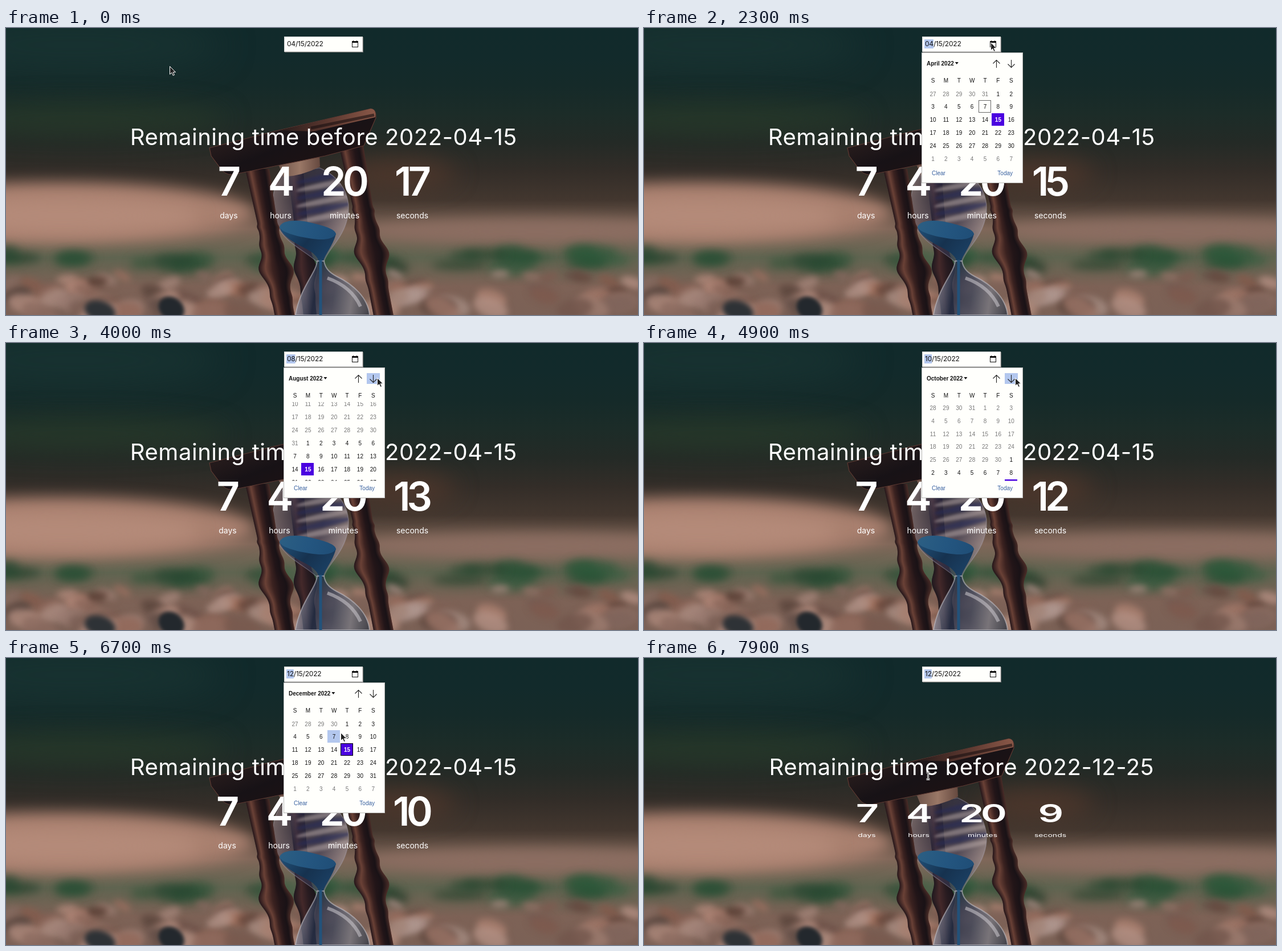
An HTML page with a canvas for the animation above (8 s loop, 1109 by 505 pixels).

```html
<!DOCTYPE html>
<html lang="en">
<head>
<meta charset="utf-8">
<title>Countdown</title>
<style>
html, body { margin: 0; width: 100%; height: 100%; overflow: hidden; background: #10292b; }
canvas { display: block; }
</style>
</head>
<body>
<canvas id="stage" width="1109" height="505"></canvas>
<script>
const W = 1109, H = 505, LOOP = 8000, STEP = 100;
const stage = document.getElementById('stage').getContext('2d');
const UI = '"Liberation Sans", Arial, sans-serif', SANS = 'Inter, sans-serif';

const clamp = v => Math.max(0, Math.min(1, v));
const smooth = v => v * v * (3 - 2 * v);
const bump = (u, at, width) => Math.exp(-(((u - at) / width) ** 2));

// Linear gradient with evenly spaced colours.
function fade(g, x0, y0, x1, y1, colors) {
  const grad = g.createLinearGradient(x0, y0, x1, y1);
  colors.forEach((c, i) => grad.addColorStop(i / (colors.length - 1), c));
  return grad;
}

// ---------- Photo backdrop ----------
function paintBackdrop() {
  const canvas = document.createElement('canvas');
  canvas.width = W;
  canvas.height = H;
  const g = canvas.getContext('2d');
  let seed = 11;
  const rnd = () => (seed = seed * 16807 % 2147483647) / 2147483647;
  const blob = (x, y, rx, ry, color, blur, turn = 0) => {
    g.filter = `blur(${blur}px)`;
    g.fillStyle = color;
    g.beginPath();
    g.ellipse(x, y, rx, ry, turn, 0, 7);
    g.fill();
  };
  const shape = (d, fill, stroke, width = 1) => {
    const path = new Path2D(d);
    if (fill) { g.fillStyle = fill; g.fill(path); }
    if (stroke) { g.strokeStyle = stroke; g.lineWidth = width; g.stroke(path); }
  };

  g.fillStyle = fade(g, 0, 0, 0, H, ['#112a2b', '#122a2b', '#152a29', '#1c2c28', '#242a26',
    '#332d28', '#43372f', '#806759', '#5f6450', '#7d6256', '#7b6156']);
  g.fillRect(0, 0, W, H);
  blob(120, 30, 260, 50, 'rgba(30,58,54,.5)', 30);
  blob(130, 160, 260, 28, 'rgba(44,62,42,.6)', 22);
  blob(90, 325, 345, 54, '#a9806f', 13);
  blob(100, 330, 240, 30, '#b48a79', 14);
  blob(690, 255, 100, 28, 'rgba(92,60,46,.6)', 20);
  blob(930, 358, 300, 22, '#8b6d61', 11);

  // Out-of-focus grass, then pebbles that grow towards the viewer
  for (let i = 0; i < 34; i++)
    blob(rnd() * W, 393 + rnd() * 30, 20 + rnd() * 30, 6 + rnd() * 9, `hsla(140,34%,${16 + rnd() * 13}%,.6)`, 8);
  for (let i = 0; i < 90; i++) {
    const depth = i / 90;
    blob(rnd() * W, 432 + depth * 75, 16 + depth * 20, 7 + depth * 13,
      `hsla(16,${16 + rnd() * 12}%,${27 + rnd() * 36}%,.8)`, 6, rnd() - .5);
  }
  blob(165, 498, 28, 18, '#2e3236', 4, .3);
  blob(290, 494, 24, 20, '#23282d', 3, .6);

  // Turned wooden post: a leaning axis with a radius that depends on the distance to the bulb.
  const post = (x, top, bulbY, lean, size, colors) => {
    for (let y = top; y < H; y++) {
      const u = y - bulbY;
      const r = size * (17.5 + Math.max(0, -u - 80) * .035 + 13 * bump(u, 0, 20)
        + 4 * bump(u, -42, 12) + 2 * bump(u, -75, 5) + 2 * bump(u, 48, 10));
      const cx = x + (y - top) * lean;
      g.fillStyle = fade(g, cx - r, 0, cx + r, 0, colors);
      g.fillRect(cx - r, y, 2 * r, 1.5);
    }
  };
  const wood = ['#25161a', '#6a4136', '#3b2220', '#221518', '#191216', '#4a2c27'];

  g.filter = 'blur(.6px)';
  post(508, 250, 422, .1, .66, ['#1f181e', '#44292a', '#281b20', '#1a151b']);

  // Upper glass with slanting reflections
  const bulb = new Path2D('M485 258C468 275 462 315 475 346C488 377 525 392 545 411H558C565 388 593 370 600 330C606 292 585 261 550 246Z');
  g.fillStyle = fade(g, 468, 290, 602, 320, ['rgba(150,132,136,.6)', 'rgba(54,52,80,.5)', 'rgba(62,62,90,.6)', 'rgba(160,146,150,.65)']);
  g.fill(bulb);
  g.save();
  g.clip(bulb);
  for (let i = 0; i < 6; i++)
    blob(560, 262 + i * 14, 52, 5, i % 2 ? 'rgba(188,172,170,.5)' : 'rgba(40,44,88,.6)', 2, -.2);
  g.restore();
  g.filter = 'blur(.6px)';
  g.strokeStyle = 'rgba(170,165,180,.4)';
  g.lineWidth = 1.5;
  g.stroke(bulb);

  // Sand
  shape('M480 350C483 363 500 375 522 386C540 395 546 402 550 412H556C560 397 573 385 579 362Z',
    fade(g, 490, 350, 560, 410, ['#1f4c73', '#16324f', '#1b4064']));
  shape('M480 350C485 336 516 337 541 344C566 350 579 356 579 363C569 377 539 372 511 366C492 361 482 356 480 350Z',
    fade(g, 480, 340, 580, 370, ['#2c5f83', '#245680', '#1f4d76']));

  // Lower glass
  shape('M546 410C544 432 516 456 508 505H638C635 474 609 451 580 437C565 429 560 421 558 410Z',
    fade(g, 508, 470, 638, 490, ['rgba(150,146,158,.8)', 'rgba(38,48,72,.8)', 'rgba(58,68,90,.75)', 'rgba(120,124,136,.7)', 'rgba(45,52,64,.8)']),
    'rgba(190,188,196,.6)', 2);
  shape('M564 440Q606 455 622 490', null, 'rgba(205,200,206,.55)', 6);
  shape('M552 408V505', null, '#23527a', 5);

  // Collar, front posts and top plate
  shape('M478 240L550 222L551 244Q520 260 487 262Z', fade(g, 480, 0, 551, 0, ['#6f554b', '#9a7867', '#66493f']));
  post(441, 248, 425, .187, 1, wood);
  post(606, 208, 395, .19, 1, wood);
  shape('M357 211L470 182L640 142Q650 143 649 158L628 207L560 225L398 258Q386 259 378 249L360 225Z',
    fade(g, 450, 180, 480, 255, ['#241a1b', '#171216', '#1c1214']), '#5c3932', 1.2);
  shape('M480 180L640 142Q650 143 648 157L540 182Z',
    fade(g, 480, 0, 649, 0, ['#2a1c1b', '#5a372f', '#8a5848']));
  shape('M535 176L646 153', null, 'rgba(24,16,18,.6)', 5);
  return canvas;
}

// ---------- Interface ----------
function text(str, x, y, font, color = '#fff', align = 'left', spacing = 0) {
  stage.font = font;
  stage.fillStyle = color;
  stage.textAlign = align;
  stage.letterSpacing = spacing + 'px';
  stage.fillText(str, align === 'center' ? x + spacing / 2 : x, y);
  return stage.measureText(str).width;
}
function box(x, y, w, h, fill, stroke) {
  if (fill) { stage.fillStyle = fill; stage.fillRect(x, y, w, h); }
  if (stroke) { stage.strokeStyle = stroke; stage.lineWidth = 1; stage.strokeRect(x + .5, y + .5, w - 1, h - 1); }
}
function line(d, color, width = 1) {
  stage.strokeStyle = color;
  stage.lineWidth = width;
  stage.stroke(new Path2D(d));
}

const WHITE = '#fffffc', HOVER = '#b3c7ee', ACCENT = '#4a00e0', LINK = '#365f9f';
const OPEN = 2300, CLOSE = 7800, SETTLED = 6300;
// Presses of the "next month" arrow; the calendar follows the field after a short lag.
const CLICKS = [3280, 3450, 3650, 3850, 4550, 4850, 5350, 6050], LAG = 50, SCROLL = 250;
// Pointer moves: start, duration, end point
const MOVES = [
  [500, 400, 577, 82], [1100, 300, 613, 38], [1800, 200, 608, 25],
  [2600, 300, 651, 61], [6400, 600, 522, 201], [7100, 300, 498, 207]];
const MONTHS = ['April', 'May', 'June', 'July', 'August', 'September', 'October', 'November', 'December'];
const DAY = 864e5, ORIGIN = Date.UTC(2022, 2, 27);
const firstWeek = m => Math.floor((Date.UTC(2022, m + 3, 1) - ORIGIN) / DAY / 7);
const monthAt = t => CLICKS.filter(c => c <= t).length;

function pointerAt(t) {
  let x = 287, y = 67;
  for (const [start, span, toX, toY] of MOVES) {
    const p = clamp((t - start) / span);
    x += (toX - x) * p;
    y += (toY - y) * p;
  }
  return [x, y];
}

function drawCounter(t) {
  const title = 'Remaining time before ' + (t < CLOSE ? '2022-04-15' : '2022-12-25');
  text(title, 557, 206, '400 40px ' + SANS, '#fff', 'center', .55);

  const seconds = 17 - Math.floor((t + 400) / 1000);
  const font = '600 70px ' + SANS, tight = -6;
  stage.font = font;
  stage.letterSpacing = tight + 'px';
  // A wide seconds value pushes the other columns to the left.
  const push = Math.max(0, stage.measureText(seconds).width - 58) / 2;
  stage.save();
  stage.translate(0, 280);
  stage.scale(1, 1 - .37 * clamp((t - CLOSE) / 100));
  stage.translate(0, -280);
  const column = (value, label, x) => {
    text(value, x + 1, 295, font, '#fff', 'center', tight);
    text(label, x, 335, '400 14px ' + SANS, '#fff', 'center');
  };
  column(7, 'days', 391 - push);
  column(4, 'hours', 482 - push);
  column(20, 'minutes', 594 - push);
  column(seconds, 'seconds', 713);
  stage.restore();
}

function drawField(t) {
  box(489, 16, 138, 27, '#777');
  box(488, 15, 138, 27, WHITE, '#d5d5d3');
  const month = String(4 + monthAt(t)).padStart(2, '0');
  const font = '400 12px ' + SANS;
  stage.font = font;
  stage.letterSpacing = '-.2px';
  if (t >= OPEN) box(492, 20, stage.measureText(month).width + 1, 16, HOVER);
  text(month + (t < CLOSE ? '/15/2022' : '/25/2022'), 493, 32, font, '#111', 'left', -.2);
  box(607, 23, 11, 11, null, '#111');
  box(607, 23, 11, 3, '#111');
  box(609, 22, 1, 1, '#111');
  box(615, 22, 1, 1, '#111');
}

function drawDays(t, view, px, py) {
  const pitch = 22.87, left = 495.6, top = 104.5;
  [...'SMTWTFS'].forEach((d, i) => text(d, left + pitch * (i + .5), 95.5, '10px ' + UI, '#111', 'center'));

  let first = firstWeek(view);
  if (view) {
    const from = firstWeek(view - 1), since = t - CLICKS[view - 1] - LAG;
    first = from + (first - from) * smooth(clamp((since + 20) / SCROLL));
  }
  stage.save();
  stage.beginPath();
  stage.rect(488, 104, 176, 138.5);
  stage.clip();
  for (let row = Math.floor(first); row < first + 7; row++) {
    for (let col = 0; col < 7; col++) {
      const date = new Date(ORIGIN + (row * 7 + col) * DAY);
      const day = date.getUTCDate(), month = date.getUTCMonth() - 3;
      const x = left + col * pitch, y = top + (row - first) * pitch;
      const selected = month === view && day === 15, today = month === 0 && day === 7;
      const hovered = px >= x && px < x + pitch && py >= y && py < y + pitch;
      const frame = today ? '#666' : selected && t >= SETTLED && '#000';
      box(Math.round(x), Math.round(y), 22, 22, selected ? ACCENT : hovered && HOVER, frame);
      text(day, x + pitch / 2, y + 15, (selected ? 'bold ' : '') + '10px ' + UI,
        selected ? '#fff' : month === view ? '#111' : '#777', 'center');
    }
  }
  stage.restore();
}

function drawPicker(t, px, py) {
  const view = monthAt(t - LAG);
  box(487, 43, 178, 230, WHITE, '#b8b8b6');
  const end = 496 + text(MONTHS[view] + ' 2022', 496, 65.5, 'bold 10px ' + UI, '#111');
  stage.fill(new Path2D(`M${end + 2} 60h6l-3 4z`));
  if (px > 633 && px < 656 && py > 53 && py < 72) box(633, 53, 23, 19, HOVER);
  line('M618.5 70V56.5M612.5 62.5l6-6l6 6', '#222', 1.1);
  line('M644.5 56V69.5M638.5 63.5l6 6l6-6', '#222', 1.1);
  drawDays(t, view, px, py);
  text('Clear', 505, 259, '10px ' + UI, LINK);
  text('Today', 647, 259, '10px ' + UI, LINK, 'right');
}

function drawPointer(t, x, y) {
  stage.save();
  stage.translate(Math.round(x) + .5, Math.round(y) + .5);
  if (t < CLOSE) {
    const arrow = new Path2D('M0 0V14L3.3 11L5.6 16L8 15L5.7 10.2H10Z');
    stage.fillStyle = '#222';
    stage.fill(arrow);
    stage.strokeStyle = '#fff';
    stage.lineWidth = 1;
    stage.stroke(arrow);
  } else {
    const beam = 'M-3 -6H-1L0 -5L1 -6H3M0 -5V5M-3 6H-1L0 5L1 6H3';
    line(beam, '#fff', 3);
    line(beam, '#111', 1);
  }
  stage.restore();
}

const backdrop = paintBackdrop();

function draw() {
  const t = Math.floor((performance.now() % LOOP) / STEP) * STEP;
  const [x, y] = pointerAt(t);
  stage.drawImage(backdrop, 0, 0);
  drawCounter(t);
  drawField(t);
  if (t >= OPEN && t < CLOSE) drawPicker(t, x, y);
  drawPointer(t, x, y);
  requestAnimationFrame(draw);
}
draw();
</script>
</body>
</html>
```
